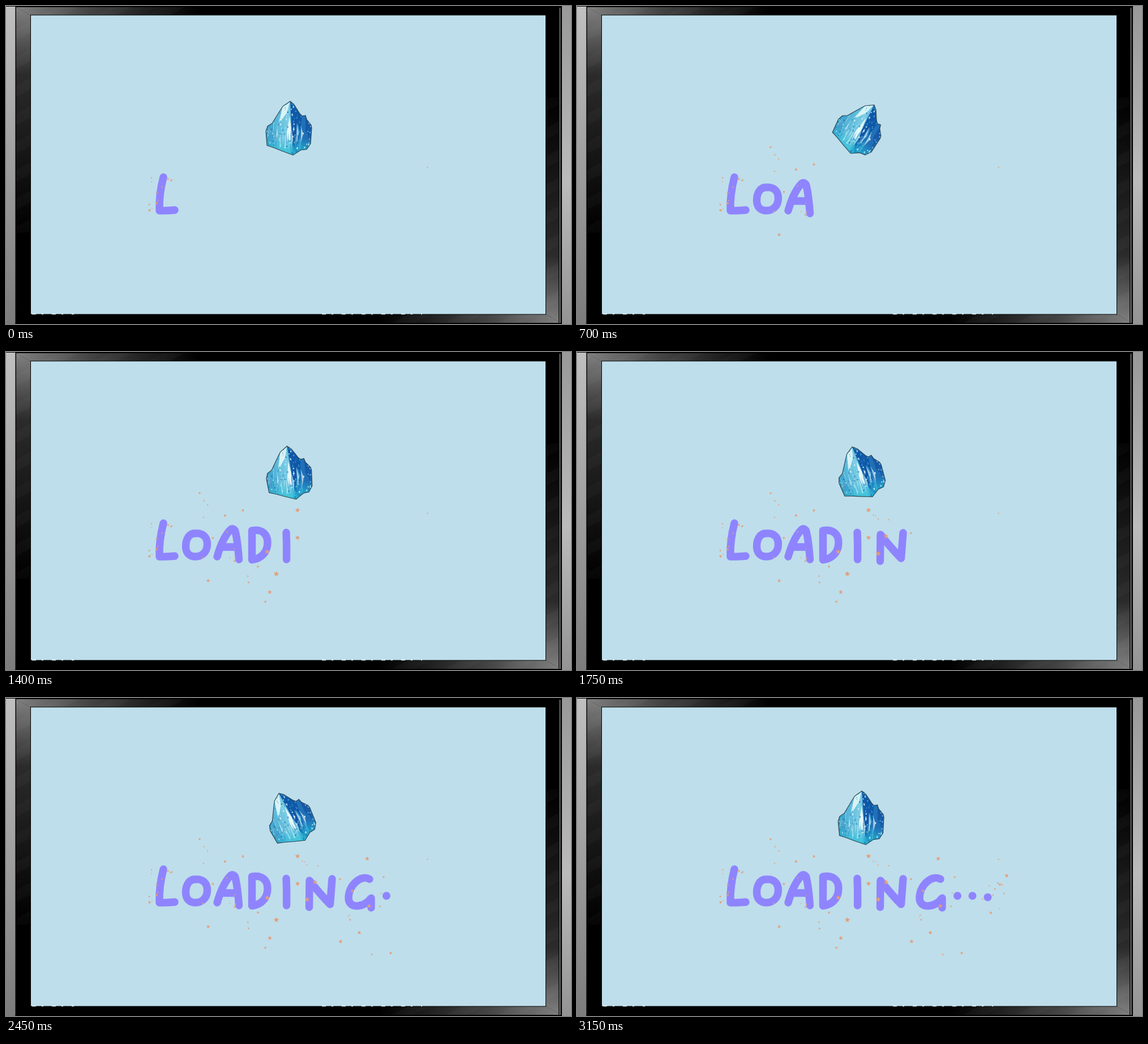
An HTML page for the animation above (3.5 s loop, 998 by 561 pixels).

```html
<!DOCTYPE html>
<html lang="en">
<head>
<meta charset="utf-8">
<title>Loading</title>
<style>
  html, body { margin: 0; width: 100%; height: 100%; overflow: hidden; background: #999; }
  svg { position: absolute; left: 0; top: 0; display: block; }
  .letter path { fill: none; stroke: #8f84ff; stroke-width: 13.4; stroke-linecap: round; stroke-linejoin: round; }
  .letter circle { fill: #8f84ff; }
  .star { fill: #e59e77; }
</style>
</head>
<body>
<svg width="998" height="561" viewBox="0 0 998 561" role="img" aria-label="LOADING...">
  <defs>
    <linearGradient id="wallL" x2="0" y2="1"><stop stop-color="#c0c0c0"/><stop offset="1" stop-color="#7c7c7c"/></linearGradient>
    <linearGradient id="wallR" x2="0" y2="1">
      <stop stop-color="#999"/><stop offset=".55" stop-color="#bbb"/><stop offset="1" stop-color="#949494"/>
    </linearGradient>
    <linearGradient id="top"><stop stop-color="#808080"/><stop offset=".4" stop-color="#444"/><stop offset="1" stop-color="#000"/></linearGradient>
    <linearGradient id="left" x2="0" y2="1">
      <stop stop-color="#808080"/><stop offset=".3" stop-color="#2b2b2b"/><stop offset=".65" stop-color="#161616"/><stop offset="1" stop-color="#000"/>
    </linearGradient>
    <pattern id="bands" width="44" height="44" patternUnits="userSpaceOnUse" patternTransform="rotate(-28)">
      <path d="M0 0H44V18H0Z" fill="#fff" opacity=".025"/>
    </pattern>
    <linearGradient id="ice">
      <stop stop-color="#2590be"/><stop offset=".2" stop-color="#55b5d8"/><stop offset=".5" stop-color="#7fcfe5"/>
      <stop offset=".62" stop-color="#2679be"/><stop offset="1" stop-color="#1c69b1"/>
    </linearGradient>
    <linearGradient id="aqua" x2="0" y2="1"><stop offset=".68" stop-color="#2cc6db" stop-opacity="0"/><stop offset="1" stop-color="#20bfd4" stop-opacity=".8"/></linearGradient>
    <path id="rock" d="M3-48L10-42L20-26L24-22L30-23L32-16L40-6L41-1L39 27L32 37L22 38L8 47L-11 40L-26 34L-38 30L-40 5L-37-4L-29-9L-14-33L-10-39Z"/>
    <clipPath id="edge"><use href="#rock"/></clipPath>
  </defs>

  <rect width="18" height="561" fill="url(#wallL)"/>
  <rect x="980" width="18" height="561" fill="url(#wallR)"/>
  <rect x="16.5" width="965.5" height="561"/>
  <g id="sheen">
    <path d="M18 2H340V17H44Z" fill="url(#top)"/>
    <path d="M18 2L44 17V400H18Z" fill="url(#left)"/>
    <path d="M18 2H340V17H44V400H18Z" fill="url(#bands)"/>
  </g>
  <use href="#sheen" transform="rotate(180 499 280.5)"/>
  <path d="M978.5 3V558" stroke="#5c5c5c" stroke-width="2.4"/>
  <path d="M976.500 3V560M0 .5H982M16 560H982" stroke="#000"/>
  <rect x="43.500" y="16" width="910" height="528" fill="#bedeeb" stroke="#000"/>
  <path d="M46 543.5H120M558 543.5H735" stroke="#e4eff2" stroke-width="1.6" stroke-dasharray="7 10 3 15"/>
  <g id="specks"></g>

  <!-- data-box: left top width height of the star cloud; data-main: its largest stars -->
  <g class="letter" data-box="253 303 42 58" data-count="10" data-main="253.5,360.5,3 266,348,3 286,305,2.6">
    <path d="M278 302Q270 333 271 361Q284 361.500 298 360"/>
  </g>
  <g class="letter" data-box="336 250 34 120" data-count="4" data-main="342,249,2.5 365.5,328,2.6 357,403.5,3.4">
    <path d="M335 320C323 319 317.500 331 317.500 343C317.500 355 325 361 334 361C346 361 355.500 353 355.500 339C355.500 325 346 319 335 320Z"/>
  </g>
  <g class="letter" data-box="388 289 18 89" data-count="5" data-main="418.5,279.5,2.9 387,288.5,2.9">
    <path d="M373 361C379 340 387 324 395 315Q400 309 404.500 315C409 331 410 348 411.500 366M382 344H407"/>
  </g>
  <g class="letter" data-box="427 380 6 42" data-count="2" data-main="461.5,352.5,4.6 445,378.5,2.6">
    <path d="M434.500 315C452 312 462 321 462 336C462 354 450 365 434.500 366.500Z"/>
  </g>
  <g class="letter" data-main="515,279,4.6 515,327.5,4.5 477.5,391.5,5 466,423.5,4 458,440.5,2.6">
    <path d="M495 318.500Q496 340 495.500 366"/>
  </g>
  <g class="letter" data-box="522 258 40 60" data-count="4" data-main="546,325,4.5 532,355.5,4.8 590,319.5,2.5">
    <path d="M535.500 369L536 322Q554 345 572.500 364L576 319"/>
  </g>
  <g class="letter" data-box="604 370 6 46" data-count="3" data-main="638,283.5,4 611.5,340.5,3 641.5,367,4.1 624,414,3.6 591,429.5,3.7">
    <path d="M642 319.500C628 311 605 329 605 353C605 372 632 371 645 353V370"/>
  </g>
  <g class="letter" data-box="660 336 15 32" data-count="2" data-main="667,316,2.3 646,452.5,2 679.5,450,3"><circle cx="672" cy="349" r="7"/></g>
  <g class="letter"><circle cx="698.5" cy="349" r="7"/></g>
  <g class="letter" data-box="714 322 42 56" data-count="8" data-main="747,329,2.9 759,313.5,3.9 731,379,3"><circle cx="725.5" cy="351.5" r="7"/></g>

  <g id="crystal">
    <g clip-path="url(#edge)">
      <use href="#rock" fill="url(#ice)"/>
      <path d="M3-48L24-22L20 10L12 38L7 30L5-8Z" fill="#0f58a8"/>
      <path d="M-10-39L2-46L-3-28L-12-15L-17-11Z" fill="#d9f3f6"/>
      <path d="M2-22L5 2L0 34L-8 36L-3 8Z" fill="#e4f7f9"/>
      <path d="M30-23L41-4L36 18L30 2Z" fill="#1659a8"/>
      <g id="streaks"></g>
      <use href="#rock" fill="url(#aqua)"/>
      <g id="frost"></g>
    </g>
    <use href="#rock" fill="none" stroke="#29434f" stroke-width="1.1" stroke-linejoin="round"/>
  </g>
</svg>
<script>
  const STEP = 350, STEPS = 10;
  const tilts = [0, 9, 29, 20, -6.6, -19, -29, -26, -1, -1];
  const shades = ['#e6fafc', '#a9e8f2', '#48bcdf', '#2479b8'];
  const get = id => document.getElementById(id);
  const crystal = get('crystal');
  const letters = [...document.querySelectorAll('.letter')];

  let seed = 29;
  const rand = (min, max) => {
    seed = seed * 16807 % 2147483647;
    return min + (max - min) * seed / 2147483647;
  };
  const shade = () => shades[Math.floor(rand(0, shades.length))];

  function add(parent, tag, attrs) {
    const el = document.createElementNS('http://www.w3.org/2000/svg', tag);
    for (const key in attrs) el.setAttribute(key, attrs[key]);
    parent.append(el);
  }

  function addStar(parent, x, y, r) {
    const points = Array.from({ length: 10 }, (_, i) => {
      const d = i % 2 ? r * 0.45 : r;
      const a = i * Math.PI / 5 - Math.PI / 2 + 0.12;
      return [x + d * Math.cos(a), y + d * Math.sin(a)];
    });
    add(parent, 'polygon', { class: 'star', points: points.join(' ') });
  }

  for (const letter of letters) {
    const { box = '', count = 0, main = '' } = letter.dataset;
    const [x, y, w, h] = box.split(' ').map(Number);
    for (const star of main.split(' ').filter(Boolean)) addStar(letter, ...star.split(',').map(Number));
    for (let i = 0; i < count; i++) addStar(letter, rand(x, x + w), rand(y, y + h), rand(1.2, 2.2));
  }
  addStar(get('specks'), 744.5, 284.5, 1.6);

  // Streaks fan out from below the peak, frost lies over everything
  for (let i = 0; i < 22; i++) {
    const x = rand(-36, 38), y = rand(-22, 10);
    add(get('streaks'), 'path', {
      d: `M${x} ${y}l${x * 0.08 + 2} ${rand(12, 22)}l${-rand(2, 5)} ${rand(10, 18)}Z`,
      fill: shade(), opacity: 0.65
    });
  }
  for (let i = 0; i < 210; i++) {
    add(get('frost'), 'ellipse', {
      cx: rand(-41, 41), cy: rand(-45, 46), rx: rand(0.5, 1.5), ry: rand(0.6, 2.1),
      fill: shade(), opacity: rand(0.6, 0.95)
    });
  }

  const start = performance.now();
  function draw() {
    const step = Math.floor((performance.now() - start) / STEP) % STEPS;
    const x = 499 + 0.7 * Math.min(3, Math.max(0, step - 5));
    const y = 216 - 0.5 * Math.min(8, step);
    crystal.setAttribute('transform', `translate(${x} ${y}) rotate(${tilts[step]})`);
    letters.forEach((el, i) => el.style.visibility = i <= step ? 'visible' : 'hidden');
    requestAnimationFrame(draw);
  }
  draw();
</script>
</body>
</html>
```
